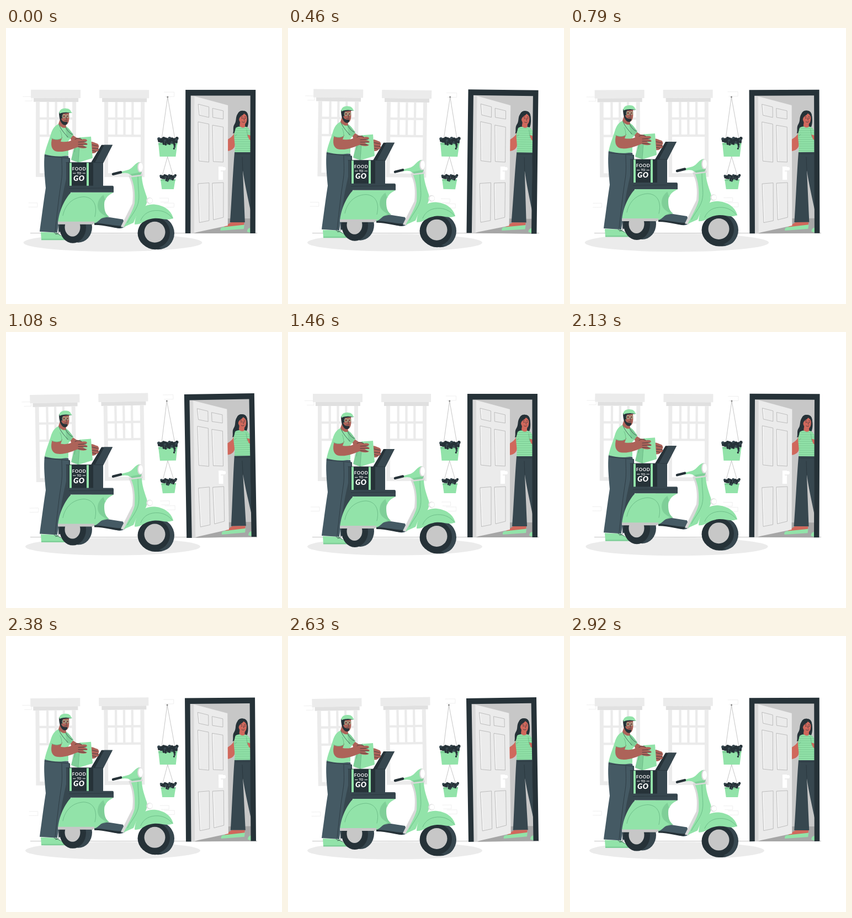
An HTML page that plays this animation: 500x500 px, repeating every 2960 ms.

```html
<!DOCTYPE html>
<html lang="en">
<head>
<meta charset="utf-8">
<title>Food delivery</title>
<style>
  html, body { margin: 0; width: 100%; height: 100%; overflow: hidden; background: #fff; }
  svg { display: block; width: 100vw; height: 100vh; }
  .green { fill: #92e3a9; }
  .leaf { fill: #7fcf98; }
  .ink { fill: #263238; }
  .slate { fill: #37474f; }
  .blue { fill: #455a64; }
  .pale { fill: #ebebeb; }
  .skin { fill: #ad6359; }
  .rose { fill: #d0685c; }
  .line { fill: none; stroke: #263238; stroke-width: .7; stroke-linecap: round; stroke-linejoin: round; }
  .soft { fill: none; stroke: #5fae7b; stroke-width: .7; stroke-linecap: round; }
  .brick { fill: none; stroke: #ebebeb; stroke-width: .8; }
  .panel { fill: none; stroke: #a9a9a9; stroke-width: .7; }
  .cord { fill: none; stroke: #a0a0a0; stroke-width: .6; }
  text { fill: #fff; font-family: Lato, "Open Sans", sans-serif; text-anchor: middle; }
</style>
</head>
<body>
<svg viewBox="0 0 500 500" xmlns="http://www.w3.org/2000/svg">
  <defs>
    <g id="window">
      <path class="pale" d="M45 112H135V127H45Z"/>
      <path d="M50 127H131V134H50Z" fill="#e0e0e0"/>
      <path d="M57.5 134V266.5H123.5V134" fill="none" stroke="#ebebeb" stroke-width="7"/>
      <path d="M75.7 134V195M90.5 134V195M105.3 134V195M58 164H123M58 195.2H123" fill="none" stroke="#ebebeb" stroke-width="4.2"/>
    </g>
    <pattern id="stripes" width="8" height="4" patternUnits="userSpaceOnUse">
      <path d="M0 0H8V4H0Z" fill="#92e3a9"/>
      <path d="M0 2H8" stroke="#6fbd88" stroke-width=".8"/>
    </pattern>
  </defs>

  <ellipse id="shadow" class="pale" cx="193.5" cy="388.8" rx="158.5" ry="15.8"/>
  <path d="M44 371.6H455" stroke="#a9a9a9" stroke-width=".7"/>

  <g id="wall">
    <use href="#window"/>
    <use href="#window" x="124"/>
    <path class="brick" d="M45 124.5H30M34 132.3H47V124.5M41 317H57V324.5H41M286 116H304.5V124H288M278 308H294.5V315H280M286 317H304.5V324.5H289"/>
  </g>

  <g id="pots">
    <path class="cord" d="M292.7 125L282 201M292.7 125L306 201M292.7 233L283 268M292.7 233L303 268"/>
    <circle cx="292.7" cy="125" r="1.5" fill="#8a8a8a"/>
    <path class="green" d="M276 208H310.5L307.5 233H278.5Z"/>
    <path class="leaf" d="M276 208H310.5L310 212H276.5Z"/>
    <path class="green" d="M280 274H307L304 292H282.5Z"/>
    <path class="leaf" d="M280 274H307L306.5 277H280.5Z"/>
    <g id="bushes"></g>
  </g>

  <g id="entry">
    <path d="M334 121H443V372H334Z" fill="#c7c7c7"/>
    <path d="M341 372L402 345H443V372Z" fill="#a6a6a6"/>

    <!-- woman -->
    <path class="ink" d="M420 155C415 161 418 168 414 174C410 180 413 185 411 191C417 190 420 184 424 179L437 180C440 174 440 162 437 155C433 148 423 148 420 155Z"/>
    <path class="rose" d="M417 182C414 190 412 195 406 199L400 203V223C406 223 412 220 414 215L419 198Z"/>
    <path d="M416 181C421 177 430 178 435 179C440 181 443 185 443 190V226H414C416 213 413 203 413 193Z" fill="url(#stripes)"/>
    <path class="rose" d="M424 170L433 173L433 179C429 182 425 180 423 177Z"/>
    <path class="rose" d="M421 158C424 152 434 151 436 157C437 164 437 171 432 175C426 176 421 169 421 158Z"/>
    <path class="ink" d="M419 162C418 153 424 149 430 150C437 150 440 157 438 167C437 161 435 157 431 155C429 159 423 159 422 166Z"/>
    <path class="line" d="M426 161L428 160.6M432.4 160.5L434.3 161M430.6 163L431.6 167M427.6 170Q430 172 432.4 170"/>
    <circle class="ink" cx="427.6" cy="163.5" r=".8"/><circle class="ink" cx="433.4" cy="163.5" r=".8"/>
    <path class="rose" d="M437 193L443 195V204L440 201Z"/>
    <path class="soft" d="M436 184L438 198M414 196L418 193"/>
    <path class="slate" d="M414 225H443V330C438 306 432 280 429 258L433 352H406C409 310 411 262 414 225Z"/>
    <path class="line" d="M428 234L429 259M416 228H442"/>
    <path class="rose" d="M408 352H432L431 358L394 362C397 357 403 356 408 352Z"/>
    <path class="green" d="M389 367C388 363 390 361 395 360.5L432 356.5L431 364Z"/>
    <path class="green" d="M437 369C437 364 440 362 443 362V371Z"/>

    <!-- door leaf -->
    <path d="M334 122L341 123.5V371L334 372Z" fill="#d9d9d9"/>
    <path class="pale" d="M341 123.5L402 140V358L341 371Z"/>
    <path class="panel" d="M348 138L367.5 143V162M393.5 150V165L374.5 162L374 145.5L393.5 150M367.5 162L350 158L348 138M348 170L367.5 174V243L349.5 241L348 170M374 176L393.5 179.5V243L375.5 242L374 176M348 282L368 280.5V349L350.5 352.5L348 282M374 281L394 280V343L376 347.5L374 281"/>
    <path d="M349.5 171.5L350.8 240M375.4 178L376.8 241M349.5 284L351.8 351M375.5 283L377.4 346M349.8 140L351.3 157" stroke="#fff" stroke-width=".8"/>
    <path d="M385 251H393V275H385Z" fill="#fff"/>
    <path d="M388 252H396Q398 252 398 255T396 258H388Z" fill="#fff"/>
    <path d="M389 259H393" stroke="#d0d0d0" stroke-width=".7"/>

    <path class="ink" fill-rule="evenodd" d="M325 112H452V372H442.5V122.5H334.5V372H325Z"/>
  </g>

  <g id="rider">
    <!-- man -->
    <path class="green" d="M63 370L92 371C99 376 106 379 108 384H64Z"/>
    <path class="leaf" d="M64 382H108V384.5H64Z"/>
    <path class="line" d="M87 371C91 374 96 373 99 376M90 374L96 371"/>
    <path class="slate" d="M92 230L116 236L117 300L111 368L95 370Z"/>
    <path class="blue" d="M70 228L113 232C116 245 110 270 105 292C99 318 97 345 93 371L61 369C66 333 68 316 72 290C70 267 68 247 70 228Z"/>
    <path class="line" d="M101 236C101 254 103 263 99 286C95 312 92 342 89 369M70 232L113 236"/>
    <path class="skin" d="M114 190L128 199L149 202L148 216L122 218Z"/>
    <path class="green" d="M95 174C88 178 85 182 82 190C78 204 73 214 70 229C84 233 98 234 113 231L113 205L122 194C117 187 114 181 108 178Z"/>
    <path class="leaf" d="M107 179C114 181 117 187 122 193L116 201L110 198Z"/>
    <path class="line" d="M107 178C111 186 114 190 120 193M96 175C99 184 106 191 112 198"/>
    <path class="skin" d="M98 165L108 170L109 180C105 183 99 180 95 174Z"/>
    <path class="skin" d="M97 154H114C115 164 115 174 108 176C101 175 97 167 97 154Z"/>
    <path class="ink" d="M96 153H103L102 164L100 164C101 169 104 171 111 170C112 176 106 178 102 174C98 170 96 162 96 153Z"/>
    <path class="green" d="M97 156C95 149 102 145 109 146C114 146 117 149 118 152L120 154C116 155 109 151 97 156Z"/>
    <path class="ink" d="M97 155.5C106 151.5 113 153 119 154.5C112 154 106 155 97 157.2Z"/>
    <g fill="none" stroke="#9fd8ad" stroke-width=".8"><circle cx="105" cy="160.2" r="3"/><circle cx="111.4" cy="160" r="2.6"/></g>
    <path class="line" d="M109 161L110 166M106 168.5L111 167.8"/>
    <circle class="ink" cx="105.4" cy="160" r=".8"/><circle class="ink" cx="111.6" cy="160" r=".8"/>

    <!-- box lid and shell -->
    <path class="ink" d="M154 244L173 212H193L176 245Z"/>
    <path class="slate" d="M161 244L178 212H193L176 245Z"/>

    <!-- paper bag and arms -->
    <path class="skin" d="M150 207C156 205 160 208 166 210C169 213 169 216 167 218C170 221 167 224 164 224C162 228 157 228 152 226Z"/>
    <path class="line" d="M156 212L166 214M156 218L167 219M155 222L164 224"/>
    <path class="leaf" d="M127 202L135 198L131 244L118 239Z"/>
    <path class="green" d="M134 198.5L154 197L157 236L131 244Z"/>
    <path class="soft" d="M134 199L131 243M128 204L124 225"/>
    <path class="skin" d="M84 198C80 212 82 222 92 224C106 226 119 220 130 216C137 219 144 219 147 216C144 215 141 214 139 212L147 212C149 210 146 208 141 207L147 205C147 202 144 201 138 202C133 198 127 199 120 203C114 207 106 207 99 206L102 198Z"/>
    <path class="line" d="M131 207L145 206M131 211L146 211M131 215L144 216M125 202C130 199 133 200 137 202"/>
    <path class="green" d="M89 180C83 184 82 193 82 200C89 204 96 203 101 200C101 190 98 182 89 180Z"/>
    <path class="soft" d="M82.5 200C89 203.5 96 203 101 200C101 194 100 189 98 186"/>

    <!-- delivery box -->
    <path class="slate" d="M109 244H176V287H109Z"/>
    <path class="ink" d="M114 244H158V287H114Z"/>
    <path class="green" d="M115 244H119V287H115ZM146 244H150V287H146Z"/>
    <path class="line" d="M109 244H176"/>
    <text x="132.6" y="258" font-size="8" font-weight="700" letter-spacing=".6">FOOD</text>
    <text x="132.4" y="265.4" font-size="5.6" font-weight="700">TO</text>
    <path d="M121 263.4H126.5M138.5 263.4H144" stroke="#fff" stroke-width=".9"/>
    <text x="132.4" y="277.3" font-size="13.5" font-weight="900" font-style="italic" letter-spacing=".8">GO</text>

    <!-- rear wheel -->
    <ellipse class="slate" cx="131" cy="361" rx="25" ry="28"/>
    <ellipse class="ink" cx="121" cy="361.5" rx="24" ry="28.5"/>
    <ellipse cx="120.5" cy="361" rx="14" ry="17" fill="#c7c7c7"/>

    <!-- scooter body -->
    <path class="blue" d="M158 354L174 341L212 347L216 359C212 364 206 364 199 362L168 355Z"/>
    <path class="ink" d="M160 354C174 353 188 358 210 359L207 363C193 363 181 357 160 357Z"/>
    <path class="leaf" d="M155 298H195C184 303 178 309 178 320C178 332 181 338 187 342L173 345L159 354Z"/>
    <path class="green" d="M118 298H186C173 302 166 311 166 322C166 331 172 337 181 341C169 345 167 354 158 354H94C96 331 107 309 118 298Z"/>
    <path class="green" d="M175 298H195C184 303 181 308 180 313Z"/>
    <path d="M94 351H161L158 356H94Z" fill="#c7c7c7"/>
    <path class="soft" d="M103 340C107 320 121 307 141 306C159 307 166 322 161 342"/>
    <path class="slate" d="M116 286H193Q195 286 195 289V298H117Q114 298 114 295V288Q114 286 116 286Z"/>
    <path d="M114 291L195 290" stroke="#263238" stroke-width=".6"/>

    <!-- front wheel and fender -->
    <circle class="slate" cx="275.5" cy="372" r="29.5"/>
    <circle class="ink" cx="270" cy="372" r="29.5"/>
    <ellipse class="ink" cx="271" cy="372" rx="32.5" ry="28.8"/>
    <ellipse class="slate" cx="284" cy="372" rx="20" ry="27"/>
    <circle class="ink" cx="269" cy="371" r="28"/>
    <circle cx="269.5" cy="370" r="19" fill="#c7c7c7"/>
    <path d="M222 268C230 285 231 300 229 318L208 360L215 362L238 320L232 268Z" fill="#d9d9d9"/>
    <path class="green" d="M226 269L246 267C246 281 251 294 255 306C259 319 248 331 236 341L231 353L213 361C222 344 230 331 233 318C234 300 233 284 226 269Z"/>
    <path class="soft" d="M239 270C239 294 243 304 239 319C235 332 226 341 220 353"/>
    <path class="green" d="M233 356C234 332 250 318 270 320C288 322 300 332 303 345C287 351 280 342 263 346C250 348 246 357 233 356Z"/>
    <path class="soft" d="M244 349C249 336 261 330 276 331C288 332 296 338 302 345"/>
    <circle cx="260" cy="313" r="5.8" fill="#e0e0e0"/>
    <circle cx="261" cy="313" r="4.5" fill="#fff"/>

    <!-- handlebar and lamp -->
    <path d="M223 263L246 261L248 268L225 271Z" fill="#d9d9d9"/>
    <path class="green" d="M207 261L222 257C230 254 234 244 242 243C249 249 248 262 241 264L225 266C220 262 215 263 208 264Z"/>
    <path class="leaf" d="M225 265L246 261L244 266L228 268Z"/>
    <ellipse cx="243" cy="252.5" rx="5" ry="9.5" fill="#d9d9d9"/>
    <ellipse cx="244" cy="252.3" rx="4" ry="8" fill="#fff"/>
    <path d="M194 265L208 261.5" stroke="#263238" stroke-width="4.5" stroke-linecap="round"/>
  </g>
</svg>
<script>
  const LOOP = 2960, BEAT = 1500, LEAD = 32;
  const $ = id => document.getElementById(id);

  // Each curve is a list of [phase, value] points joined by straight lines.
  const sway = [[0, 0], [.25, 1], [.75, -1], [1, 0]];
  const lift = [[0, 0], [.5, -6.6], [1, 0]];
  const pulse = [[0, 1], [.1, 1.1], [.3, 1], [.4, 1], [.5, 1.1], [.6, 1], [1, 1]];

  function at(curve, p) {
    const i = curve.findIndex((point, k) => k > 0 && p <= point[0]);
    const [p0, v0] = curve[i - 1], [p1, v1] = curve[i];
    return v0 + (v1 - v0) * (p - p0) / (p1 - p0);
  }

  function bush(x, y, step, drops) {
    let dots = "";
    [...drops].forEach((n, i) => {
      for (let j = 0; j < n; j++) {
        const cx = x + i * step + Math.sin(j * 2 + i) * .7;
        const cy = y + j * step * .82 + Math.sin(i * 2.1) * 1.2;
        const r = step * (.72 - j * .06);
        dots += `<circle class="${(i * 3 + j) % 5 ? "ink" : "slate"}" cx="${cx}" cy="${cy}" r="${r}"/>`;
      }
    });
    return dots;
  }
  $("bushes").innerHTML = bush(277, 201, 4, "224434363") + bush(280.5, 268, 3.2, "223443332");

  const pivots = { wall: "167 218", pots: "293 208", entry: "388.5 242" };

  function draw() {
    const p = (performance.now() % LOOP + LEAD) % BEAT / BEAT;
    const angle = at(sway, p), size = at(pulse, p);
    for (const id in pivots) $(id).setAttribute("transform", `rotate(${angle} ${pivots[id]})`);
    $("rider").setAttribute("transform", `translate(0 ${at(lift, p)})`);
    $("shadow").setAttribute("transform", `translate(193.5 388.8) scale(${size}) translate(-193.5 -388.8)`);
    requestAnimationFrame(draw);
  }
  draw();
</script>
</body>
</html>
```
